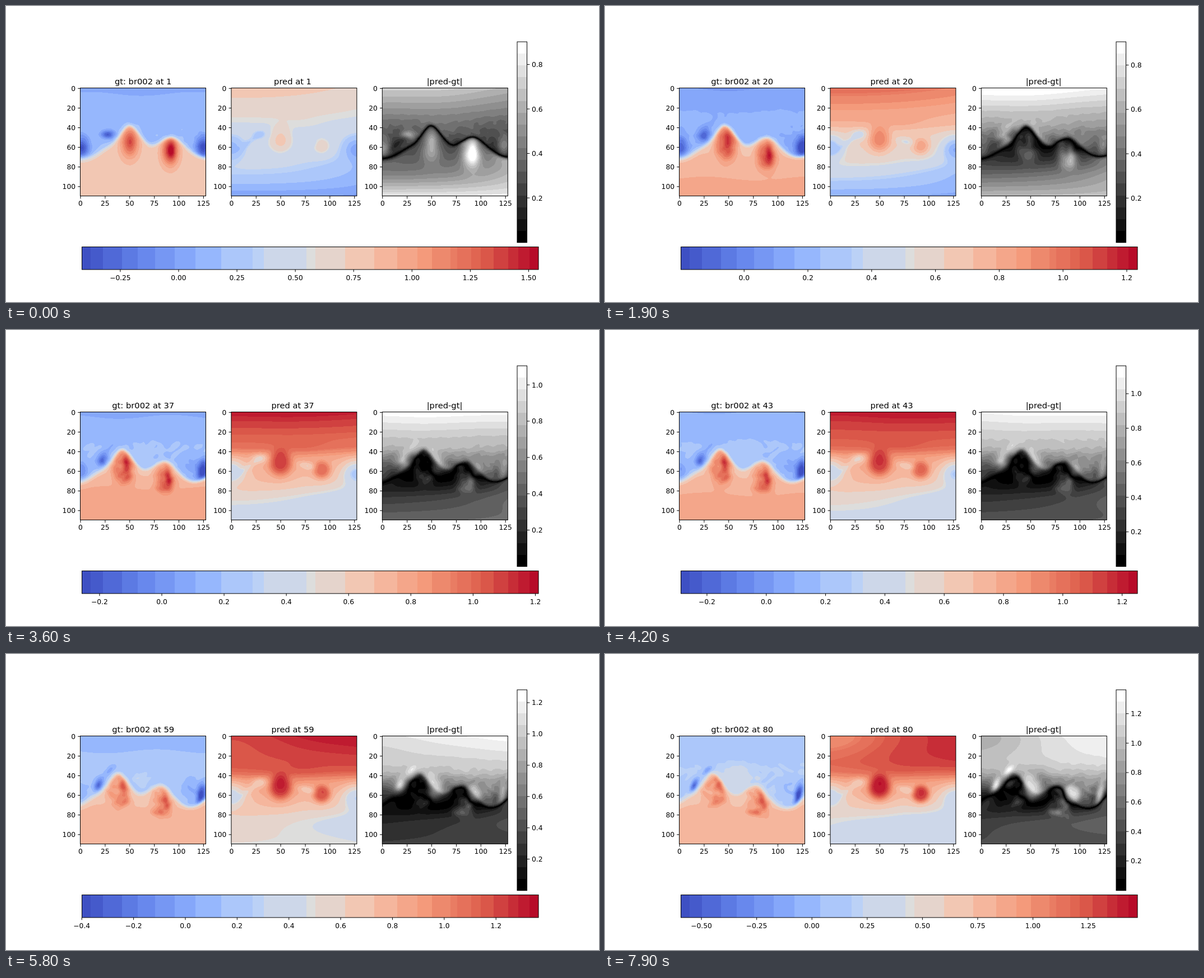
An HTML page with a canvas that plays this animation: 1058 px wide and 529 px high, repeating every 8 s.

```html
<!DOCTYPE html>
<html lang="en">
<head>
<meta charset="utf-8">
<title>Field comparison</title>
<style>
html, body { margin: 0; width: 100%; height: 100%; overflow: hidden; background: #fff; }
canvas, svg { position: absolute; left: 0; top: 0; width: 1058px; height: 529px; display: block; }
text { font: 12.25px "DejaVu Sans", sans-serif; }
text.title { font-size: 14.69px; }
</style>
</head>
<body>
<canvas id="fields" width="1058" height="529"></canvas>
<svg viewBox="0 0 1058 529"><g id="fixed"></g><g id="live"></g></svg>
<script>
const W = 224, H = 193, SCALE = 1.755, TOP = 147;
const LEFTS = [0, 1, 2].map(i => 132.5 + 269.4 * i);
const STEP = 100, COUNT = 80;
const ctx = document.getElementById('fields').getContext('2d');
const fixed = document.getElementById('fixed'), live = document.getElementById('live');

const { exp, sin, pow, min, max, floor, round, abs, PI } = Math;
const lerp = (a, b, u) => a + (b - a) * u;
const clamp = (v, a, b) => max(a, min(b, v));

// Smooth curve through points with rising x.
function curve(pts) {
  const last = pts.length - 1;
  const slope = pts.map((p, i) => {
    const a = pts[max(0, i - 1)], b = pts[min(last, i + 1)];
    return (b[1] - a[1]) / (b[0] - a[0]);
  });
  return x => {
    let i = 0;
    while (i < last - 1 && x > pts[i + 1][0]) i++;
    const [x0, y0] = pts[i], [x1, y1] = pts[i + 1];
    const d = x1 - x0, u = (x - x0) / d, v = 1 - u;
    return v * v * (1 + 2 * u) * y0 + u * v * v * d * slope[i]
      + u * u * (3 - 2 * u) * y1 - u * u * v * d * slope[i + 1];
  };
}

// Ends of the three value scales.
const KEYS = [1, 11, 20, 37, 50, 69, 80];
const scale = (...vals) => curve(vals.map((v, i) => [KEYS[i], v]));
const lowEnd = scale(-.4155, -.244, -.199, -.2575, -.334, -.4826, -.594);
const highEnd = scale(1.542, 1.309, 1.2335, 1.21, 1.315, 1.413, 1.473);
const errEnd = scale(.902, .795, .905, 1.105, 1.217, 1.342, 1.362);

// Bell with optional lean and flatter top.
function bell(x, y, cx, cy, sx, sy, lean = 0, flat = 1) {
  const dy = y - cy, dx = (x - cx - lean * dy) / sx;
  const q = dx * dx + dy * dy / (sy * sy);
  return q > 7 ? 0 : exp(-(flat === 1 ? q : pow(q, flat)));
}
const bump = (d, w) => exp(-d * d / (w * w));
const swirl = (x, y, p) =>
  sin(.22 * x + p + 1.7 * sin(.19 * y - p)) * sin(.27 * y + 1.5 * sin(.17 * x + p));

// Prediction: a vertical profile, tilted to the right, with two warm blobs and cold ends.
function prediction(t) {
  const t2 = t * t, b = sin(PI * t / 1.5);
  const top = .77 + .52 * b, mid = .45 + .31 * b, low = .5 * pow(b, 1.5);
  const above = f => lerp(mid, top, f), below = f => lerp(low, mid, f);
  const profile = curve([
    [0, top], [24, above(.55 + .5 * t2)], [36, above(.28 + .55 * t)], [46, above(.05 + .3 * t)],
    [60, mid], [74, below(.92 - .3 * t2)], [88, below(.7 - .6 * t)], [109, low]
  ]);
  const flat = 1.4 + .6 * t;
  return y => {
    const level = profile(y);
    const tilt = (.25 * t2 - .09) * max(0, 1 - y / 60) - .19 * bump(y - 82, 20);
    return x => level + tilt * pow(x / 127, 2.5 - 1.5 * t)
      + .04 * bell(x, y, 72, 38, 25, 9)
      - .22 * t * t2 * bell(x, y, 0, 0, 55, 24)
      + (.24 + .2 * t2) * bell(x, y, 50, 52, 11.5, 13, 0, flat)
      + (.06 + .17 * t2) * bell(x, y, 50, 59, 20, 14)
      + (.18 + .33 * t2) * bell(x, y, 92, 59, 9, 9, 0, flat)
      + (.05 + .12 * t2) * bell(x, y, 92, 63, 14, 11)
      - (.33 + .1 * t) * bell(x, y, 0, 60, 13, 12)
      - .38 * bell(x, y, 127, 61, 13, 12)
      - (.2 + .04 * t) * (bell(x, y, 29, 47, 8, 5) + .55 * bell(x, y, 18, 55, 5, 9, -1.2))
      - (.1 + .13 * t) * bell(x, y, 77, 54.5, 8, 4, 1);
  };
}

// Truth: cold layer over warm layer, split by two drifting hills with a plume under each.
function truth(t) {
  const t2 = t * t, phase = 1 + 3 * t, young = exp(-t / .12);
  const c1 = 50 - 16 * t, c2 = 92 - 14.5 * t;
  const grow = min(1, 7 * t), flat = 1 + min(.7, 2.5 * t);
  const sky = .095 - .04 * young, warm = .65 + .08 * young, deep = .82 - .03 * young;
  const body1 = .24 + .34 * exp(-t / .25), body2 = .22 + .5 * exp(-t / .15);
  const core1 = .06 + .26 * t, core2 = .14 + .22 * t;
  const cold1 = .05 + .5 * exp(-t / .4);
  const cold2 = .28 + .37 * t2 + .22 * young;
  const cold3 = .42 + .33 * t2 + .16 * young;

  const edge = x => 72 - 33 * bump(x - c1, x < c1 ? 14 : 17)
    - 10 * bump(x - c1 + 22, 14)
    - 22 * bump(x - c2, x < c2 ? 20 : 20 - 5 * t)
    + 2 * t * bump(x - 110, 12) - 12 * t * bump(x - 132, 12);

  function cold(x, y) {
    let v = sky + .1 * min(1, (y + 2 * sin(x * .06 + phase)) / 36);
    if (y < 18) return v;
    const ns = swirl(x * 1.3, y * 1.3, phase + 1);
    return v + bump(y - 47, 16) * ns * (.03 + .07 * t * bell(x, y, 118, 50, 30, 30))
      + .18 * t2 * bell(x, y, c1 + 24, 43, 13, 11)
      - cold1 * bell(x, y, 1, 61 - 3 * t, 8 - 2 * t, 12)
      - cold2 * bell(x, y, 28 - 13 * t, 47 + 3 * t, 7 - 3 * t, 4.5 + 3 * grow, -.35 * t)
      - cold2 * .6 * t * bell(x, y, 34 - 6 * t, 35, 4, 5, -.6)
      - cold3 * bell(x, y, 125 - 4 * t2, 60, 8 - 4 * t, 12, -.2 * t)
      - .2 * t * bell(x, y, 112, 54, 10, 13) * (1 + ns);
  }

  function hot(x, y) {
    const depth = max(0, y - 60 + 2 * sin(x * .06));
    const v = lerp(deep, warm, exp(-depth / 18));
    if (y > 95) return v;
    const ns = swirl(x * 1.4, y * 1.2, phase);
    const bx = x + 2 * t * sin(y * .3 + phase);
    return v
      + (body1 + .1 * t * ns) * bell(bx, y, c1 + 2 * grow * (1 - t), 55, 10 + 2.5 * grow, 16 + 2 * grow, 0, flat)
      + (body2 + .1 * t * ns) * bell(bx, y, c2 - 1 + 2 * t, 63 + 4 * grow, 9 + 2 * grow, 15, .15 * t, flat)
      + core1 * (bell(x, y, c1 + 1 + 7 * t, 53, 4, 11, .35 * t) + .7 * t * bell(x, y, c1 + 5, 67, 5, 4, -.6))
      + core2 * (bell(x, y, c2 + 1 + 6 * t, 63 + 3 * grow, 4, 11, .3 * t) + .6 * t * bell(x, y, c2 - 2, 78, 7, 3, .4));
  }

  return x => {
    const h = edge(x), d = edge(x + .5) - edge(x - .5);
    const width = (2 + 1.3 * bump(x, 24)) * Math.hypot(1, d);
    return y => {
      const side = .5 + .5 * Math.tanh((y - h) / width);
      return (side < .998 ? cold(x, y) * (1 - side) : 0) + (side > .002 ? hot(x, y) * side : 0);
    };
  };
}

// Banded colours.
const STOPS = ['3b4cc0', '6282ea', '8db0fe', 'b8d0f9', 'dddddd', 'f5c4ad', 'f49a7b', 'de604d', 'b40426']
  .map(s => [0, 2, 4].map(i => parseInt(s.slice(i, i + 2), 16)));
function ramp(u) {
  const i = min(7, floor(u * 8));
  return STOPS[i].map((c, k) => round(lerp(c, STOPS[i + 1][k], u * 8 - i)));
}
const CUTS = [135, 151, 173, 207, 235, 266, 301, 338, 384, 440, 460, 536, 552, 605, 657, 698,
  734, 760, 793, 805, 830, 847, 870, 896, 914, 934, 950];
const BANDS = CUTS.slice(1).map((c, i) => ramp(((c + CUTS[i]) / 2 - 135) / 815));
const LOOKUP = Array.from({ length: 816 }, (_, i) =>
  BANDS[clamp(CUTS.findIndex(c => c > i + 135) - 1, 0, 25)] || BANDS[25]);
LOOKUP[815] = BANDS[25];
const GRAYS = Array.from({ length: 17 }, (_, i) => Array(3).fill(round(i * 255 / 16)));

const images = LEFTS.map(() => {
  const im = ctx.createImageData(W, H);
  im.data.fill(255);
  return im;
});

function drawFields(n, lo, hi, err) {
  const t = (n - 1) / (COUNT - 1);
  const predRow = prediction(t), truthCol = truth(t);
  const xs = Array.from({ length: W }, (_, c) => (c + .5) / SCALE);
  const cols = xs.map(truthCol);
  const warmth = v => LOOKUP[clamp(round((v - lo) / (hi - lo) * 815), 0, 815)];
  for (let r = 0; r < H; r++) {
    const y = (r + .5) / SCALE, row = predRow(y);
    for (let c = 0; c < W; c++) {
      const p = row(xs[c]), g = cols[c](y);
      const gray = GRAYS[min(16, floor(abs(p - g) / err * 17))];
      const at = (r * W + c) * 4;
      images[0].data.set(warmth(g), at);
      images[1].data.set(warmth(p), at);
      images[2].data.set(gray, at);
    }
  }
  images.forEach((im, j) => ctx.putImageData(im, round(LEFTS[j]), TOP));
}

const line = (x1, y1, x2, y2) => `<path d="M${x1} ${y1}L${x2} ${y2}" stroke="#000"/>`;
const label = (x, y, s, anchor = 'middle', cls = '') =>
  `<text x="${x}" y="${y}" text-anchor="${anchor}" class="${cls}">${s}</text>`;
const fill = (x, y, w, h, c) =>
  `<rect x="${x}" y="${y}" width="${w}" height="${h}" fill="rgb(${c})" shape-rendering="crispEdges"/>`;
const frame = (x, y, w, h) =>
  `<rect x="${x}" y="${y}" width="${w}" height="${h}" fill="none" stroke="#000"/>`;
const num = (v, digits) => (v < -1e-6 ? '\u2212' : '') + abs(v).toFixed(digits);

function drawFixed() {
  let out = '';
  for (const x0 of LEFTS) {
    out += frame(x0, TOP - .5, W, H);
    for (let v = 0; v <= 125; v += 25) {
      const x = x0 + .5 + v * SCALE;
      out += line(x, 340, x, 344.3) + label(x, 357, v);
    }
    for (let v = 0; v <= 100; v += 20) {
      const y = TOP + .3 + v * SCALE;
      out += line(x0 - 4.3, y, x0, y) + label(x0 - 8.5, y + 4.5, v, 'end');
    }
  }
  BANDS.forEach((c, i) => out += fill(CUTS[i], 431, CUTS[i + 1] - CUTS[i], 40, c));
  out += frame(135.5, 430.5, 814.5, 40.5);
  GRAYS.forEach((g, i) => out += fill(912, 423 - (i + 1) * 359 / 17, 18, 359 / 17, g));
  out += frame(912, 64, 17.5, 358.7);
  out += label(782.5, 139.5, '|pred-gt|', 'middle', 'title');
  fixed.innerHTML = out;
}

function drawLive(n, lo, hi, err) {
  let out = label(244.7, 139.5, 'gt: br002 at ' + n, 'middle', 'title')
    + label(511.5, 139.5, 'pred at ' + n, 'middle', 'title');
  const range = hi - lo, step = range > 1.8 ? .25 : .2;
  for (let j = Math.ceil(lo / step); j * step <= hi; j++) {
    const x = 135 + 815 * (j * step - lo) / range;
    out += line(x, 471, x, 475.3) + label(x, 489.7, num(j * step, step === .25 ? 2 : 1));
  }
  const rise = err > .85 ? .2 : .1;
  for (let j = 1; j * rise <= err; j++) {
    const y = 422.5 - 358.5 * j * rise / err;
    out += line(930, y, 934.3, y) + label(938, y + 4.5, num(j * rise, 1), 'start');
  }
  live.innerHTML = out;
}

let shown = 0;
const start = performance.now();
function tick() {
  const n = 1 + floor(((performance.now() - start) % (STEP * COUNT)) / STEP);
  if (n !== shown) {
    shown = n;
    const ends = [lowEnd(n), highEnd(n), errEnd(n)];
    drawFields(n, ...ends);
    drawLive(n, ...ends);
  }
  requestAnimationFrame(tick);
}
drawFixed();
tick();
</script>
</body>
</html>
```
